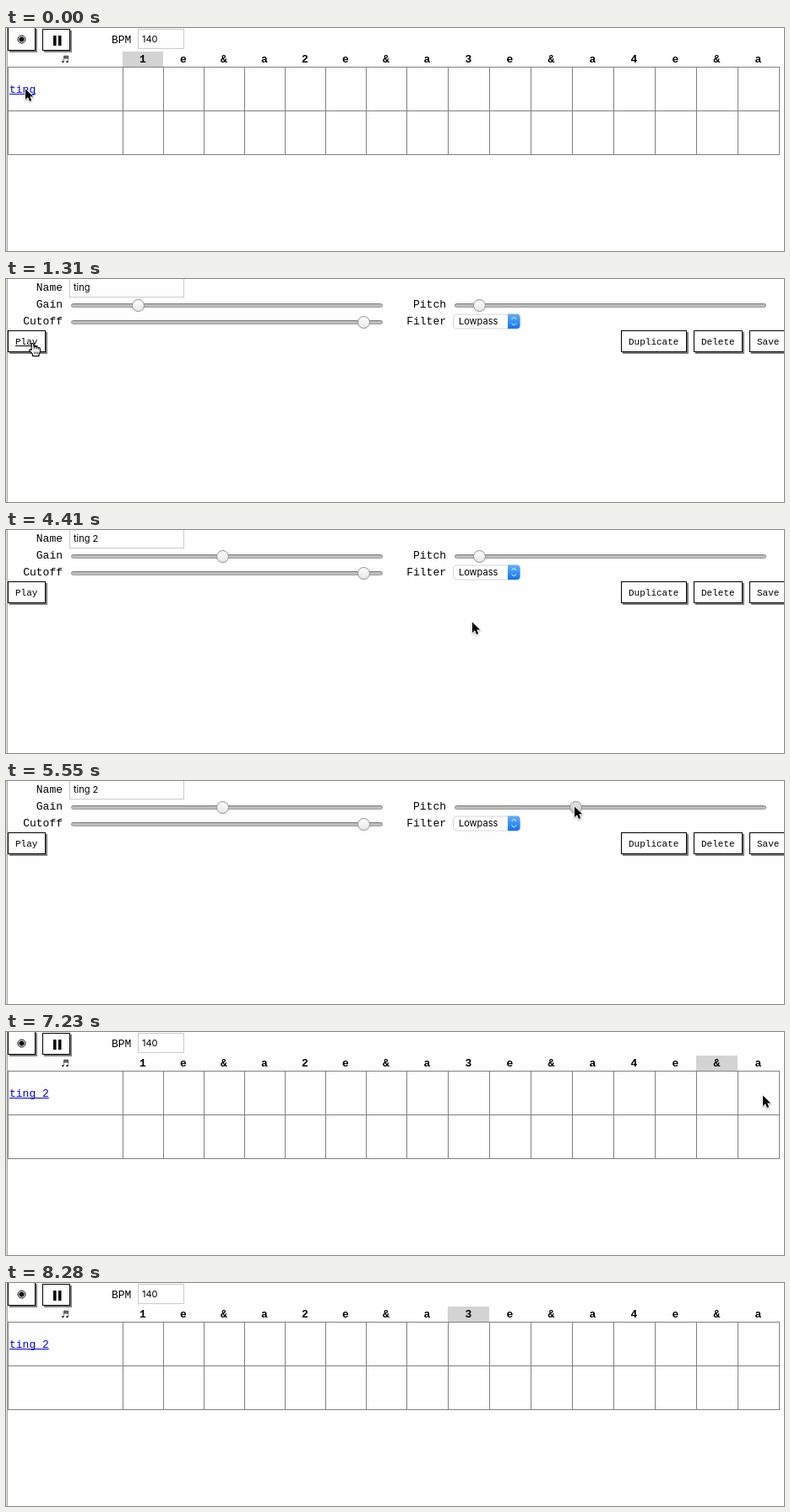
Write an HTML page with a canvas that moves like this. It is 921 by 265 pixels and loops after 8.38 s.

```html
<!DOCTYPE html>
<html lang="en">
<head>
<meta charset="utf-8">
<title>Step sequencer</title>
<style>
  html, body { margin: 0; width: 100%; height: 100%; overflow: hidden; background: #fefefe; }
  canvas { display: block; width: 921px; height: 265px; }
</style>
</head>
<body>
<canvas id="stage" width="921" height="265"></canvas>
<script>
const ctx = document.getElementById('stage').getContext('2d');
const PAPER = '#fefefe';
const MONO = '"Liberation Mono", "Courier New", monospace';
const SANS = 'Inter, "Liberation Sans", sans-serif';

// Times in ms.
const LOOP = 8380, FIRST_TICK = 70, TICK = 88.27;
const SIXTEENTH = 60000 / 140 / 4;
const EDITOR_OPEN = 860, EDITOR_CLOSE = 6775;
const PLAY_HOVER = 1300, GAIN_GRAB = 1910, GAIN_DROP = 2360;
const FOCUS = 2980, TYPE_SPACE = 3420, TYPE_DIGIT = 3770, BLUR = 4220;
const PITCH_GRAB = 4830, PITCH_DROP = 5815;
const SAVE_DOWN = 6600, SAVE_UP = 6690;

const within = (v, from, to) => v >= from && v < to;

const recorded = t => t < FIRST_TICK ? 0 : FIRST_TICK + Math.floor((t - FIRST_TICK) / TICK) * TICK;

function ease(t, from, to) {
  const k = Math.min(1, Math.max(0, (t - from) / (to - from)));
  return k * k * (3 - 2 * k);
}

const moves = [
  { from: 1220, to: PLAY_HOVER, x: 31, y: 75 },
  { from: PLAY_HOVER, to: 1570, x: 165, y: 38 },
  { from: 1660, to: GAIN_GRAB, x: 154, y: 28 },
  { from: GAIN_GRAB, to: GAIN_DROP, x: 254, y: 28 },
  { from: 2540, to: FOCUS, x: 132, y: 6 },
  { from: 4060, to: 4390, x: 552, y: 109 },
  { from: 4590, to: PITCH_GRAB, x: 558, y: 29 },
  { from: PITCH_GRAB, to: 5190, x: 634, y: 29 },
  { from: 5380, to: PITCH_DROP, x: 758, y: 32 },
  { from: 5990, to: 6510, x: 896, y: 75 },
  { from: 7230, to: 8090, x: 916, y: 275 }
];

function pointerAt(t) {
  const pos = { x: 23, y: 72 };
  for (const { from, to, x, y } of moves) {
    const k = ease(t, from, to);
    pos.x += (x - pos.x) * k;
    pos.y += (y - pos.y) * k;
  }
  return pos;
}

// A grabbed knob follows the pointer until it is dropped.
const gainAt = t => t < GAIN_GRAB ? 156 : pointerAt(Math.min(t, GAIN_DROP)).x + 2;
const pitchAt = t => Math.max(560, pointerAt(Math.min(t, PITCH_DROP)).x + 1);

function rect(x, y, w, h, color) {
  ctx.fillStyle = color;
  ctx.fillRect(x, y, w, h);
}

function box(x, y, w, h, border, fill) {
  rect(x, y, w, h, border);
  rect(x + 1, y + 1, w - 2, h - 2, fill);
}

function raised(x, y, w, h) {
  rect(x + 2, y + 2, w, h, '#808080');
  box(x, y, w, h, '#000', PAPER);
}

function text(str, x, y, font, color = '#000', align = 'left') {
  ctx.font = font;
  ctx.textAlign = align;
  ctx.fillStyle = color;
  ctx.fillText(str, x, y);
  return ctx.measureText(str).width;
}

function gradient(y, h, top, bottom) {
  const g = ctx.createLinearGradient(0, y, 0, y + h);
  g.addColorStop(0, top);
  g.addColorStop(1, bottom);
  return g;
}

function paint(fill, stroke) {
  if (fill) { ctx.fillStyle = fill; ctx.fill(); }
  if (stroke) { ctx.strokeStyle = stroke; ctx.lineWidth = 1; ctx.stroke(); }
}

function rounded(x, y, w, h, r, fill, stroke) {
  ctx.beginPath();
  ctx.roundRect(x, y, w, h, r);
  paint(fill, stroke);
}

function disc(x, y, r, fill, stroke) {
  ctx.beginPath();
  ctx.arc(x, y, r, 0, Math.PI * 2);
  paint(fill, stroke);
}

const columnX = i => 138 + 48 * i + Math.max(0, i - 7);

function activeColumn(t) {
  const step = t < EDITOR_OPEN ? (t + 47) / SIXTEENTH : (t - 8195) / SIXTEENTH + 24;
  return Math.floor(step) % 16;
}

function drawGrid(t) {
  raised(2, -1, 33, 28);
  disc(18.5, 13.5, 4.5, null, '#000');
  disc(18.5, 13.5, 3, '#000');
  raised(43, 1, 33, 26);
  rect(56, 9, 3.5, 12, '#000');
  rect(62, 9, 3.5, 12, '#000');
  text('BPM', 125, 18, `13px ${MONO}`);
  box(156, 1, 55, 24, '#ccc', PAPER);
  text('140', 161, 17, `11px ${SANS}`);

  const col = activeColumn(t);
  rect(columnX(col), 28, columnX(col + 1) - columnX(col), 18, '#d3d3d3');
  text('♬', 70, 41, '11px "DejaVu Sans", sans-serif', '#000', 'center');
  for (let i = 0; i < 16; i++) {
    const label = i % 4 ? ' e&a'[i % 4] : String(i / 4 + 1);
    text(label, (columnX(i) + columnX(i + 1)) / 2, 41, `bold 13px ${MONO}`, '#000', 'center');
  }
  for (let row = 0; row < 3; row++) rect(2, 46 + 52 * row, 914, 1, '#808080');
  rect(2, 46, 1, 105, '#808080');
  for (let i = 0; i <= 16; i++) rect(columnX(i), 46, 1, 105, '#808080');

  const width = text(t < EDITOR_OPEN ? 'ting' : 'ting 2', 4, 77, `13px ${MONO}`, '#00e');
  rect(4, 78, width, 1, '#00e');
}

function drawSlider(x, y, value, held) {
  rounded(x + 0.5, y - 1.5, 368, 4, 2, '#bdbdbd', gradient(y - 2, 5, '#747474', '#a4a4a4'));
  const fill = held ? gradient(y - 7, 15, '#e4e4e4', '#cccccc') : gradient(y - 7, 15, '#ffffff', '#e6e6e6');
  disc(value + 0.5, y + 0.5, 7, fill, '#8e8e8e');
}

function drawSelect() {
  rounded(529.5, 42, 79, 17, 4, '#fff', '#d6d6d6');
  rounded(594, 41.5, 14.5, 17.5, [0, 4, 4, 0], gradient(41, 18, '#66b1fb', '#0f73f6'));
  ctx.beginPath();
  for (const side of [-1, 1]) {
    ctx.moveTo(598.5, 50.2 + 2.2 * side);
    ctx.lineTo(601.3, 50.2 + 5 * side);
    ctx.lineTo(604.1, 50.2 + 2.2 * side);
  }
  paint(null, '#fff');
  text('Lowpass', 536, 54, `11px ${SANS}`);
}

const buttons = [
  { label: 'Play', x: 2, w: 45 },
  { label: 'Duplicate', x: 728, w: 78 },
  { label: 'Delete', x: 814, w: 58 },
  { label: 'Save', x: 880, w: 45 }
];

function hoveredButton(t, { x, y }) {
  if (!within(t, PLAY_HOVER, EDITOR_CLOSE)) return null;
  return buttons.find(b => within(x, b.x, b.x + b.w) && within(y, 61, 87));
}

function drawButton({ label, x, w }, hovered, pressed) {
  const shift = pressed ? 2 : 0;
  if (pressed) box(x + 2, 63, w, 26, '#000', '#808080');
  else raised(x, 61, w, 26);
  const color = pressed ? '#fff' : '#000';
  const width = text(label, x + 9 + shift, 78 + shift, `11px ${MONO}`, color);
  if (hovered) rect(x + 9 + shift, 79 + shift, width, 1, color);
}

function drawEditor(t, hovered) {
  const label = (str, right, y) => text(str, right, y, `13px ${MONO}`, '#000', 'right');
  label('Name', 67, 14);
  label('Gain', 67, 34);
  label('Cutoff', 67, 54);
  label('Pitch', 521, 34);
  label('Filter', 521, 54);

  const focused = within(t, FOCUS, BLUR);
  box(75, -3, 136, 25, focused ? '#aaa' : '#ccc', PAPER);
  const name = t < TYPE_SPACE ? 'ting' : t < TYPE_DIGIT ? 'ting ' : 'ting 2';
  const width = text(name, 80, 14, `11px ${SANS}`);
  if (focused) rect(Math.round(80 + width), 3, 1, 13, '#000');

  drawSlider(77, 31, gainAt(t), within(t, GAIN_GRAB, 2600));
  drawSlider(77, 51, 423, false);
  drawSlider(531, 31, pitchAt(t), within(t, PITCH_GRAB, PITCH_DROP));
  drawSelect();
  for (const button of buttons) {
    const isHovered = button === hovered;
    drawButton(button, isHovered, isHovered && within(t, SAVE_DOWN, SAVE_UP));
  }
}

const arrow = new Path2D('M0 .5V13L3 10.3L5 15L7.2 14L5.2 9.4H9.2Z');
const hand = new Path2D('M-1 9.5V2.8C-1 1 1.2 1 1.4 2.8L2 6C2.5 4.8 4.4 5 4.6 6.4' +
  'C5.2 5.4 6.8 5.7 7 7C7.8 6.2 9.2 6.8 9.2 8.2V11.5L7.8 14.5V16.5H.4V14.5L-3.2 10.4C-4 8.8 -2.6 8 -1 9.5Z');
const knuckles = new Path2D('M2 6V8.5M4.6 6.4V8.5M7 7V9M2.4 11.5V14M4.4 11.5V14M6.4 11.5V14');

function drawPointer(t, { x, y }, hovered) {
  const typing = within(t, FOCUS - TICK, 4140);
  if (typing) return;
  ctx.save();
  ctx.translate(x, y);
  ctx.lineJoin = 'round';
  ctx.shadowColor = 'rgba(0,0,0,.35)';
  ctx.shadowBlur = 2;
  ctx.shadowOffsetY = 1;
  if (hovered) {
    ctx.fillStyle = '#fff';
    ctx.fill(hand);
    ctx.shadowColor = 'transparent';
    ctx.lineWidth = 1.1;
    ctx.stroke(hand);
    ctx.lineWidth = 0.8;
    ctx.stroke(knuckles);
  } else {
    ctx.strokeStyle = '#fff';
    ctx.lineWidth = 1.6;
    ctx.stroke(arrow);
    ctx.shadowColor = 'transparent';
    ctx.fillStyle = '#000';
    ctx.fill(arrow);
  }
  ctx.restore();
}

function draw(t) {
  rect(0, 0, 921, 265, PAPER);
  rect(0, 0, 1, 265, '#e4e4e4');
  rect(1, 0, 1, 265, '#a6a6a6');
  ctx.strokeStyle = '#000';
  const pointer = pointerAt(t);
  const hovered = hoveredButton(t, pointer);
  if (within(t, EDITOR_OPEN, EDITOR_CLOSE)) drawEditor(t, hovered);
  else drawGrid(t);
  ctx.strokeStyle = '#000';
  drawPointer(t, pointer, hovered);
}

const start = performance.now();
function frame() {
  draw(recorded((performance.now() - start) % LOOP));
  requestAnimationFrame(frame);
}
frame();
</script>
</body>
</html>
```
